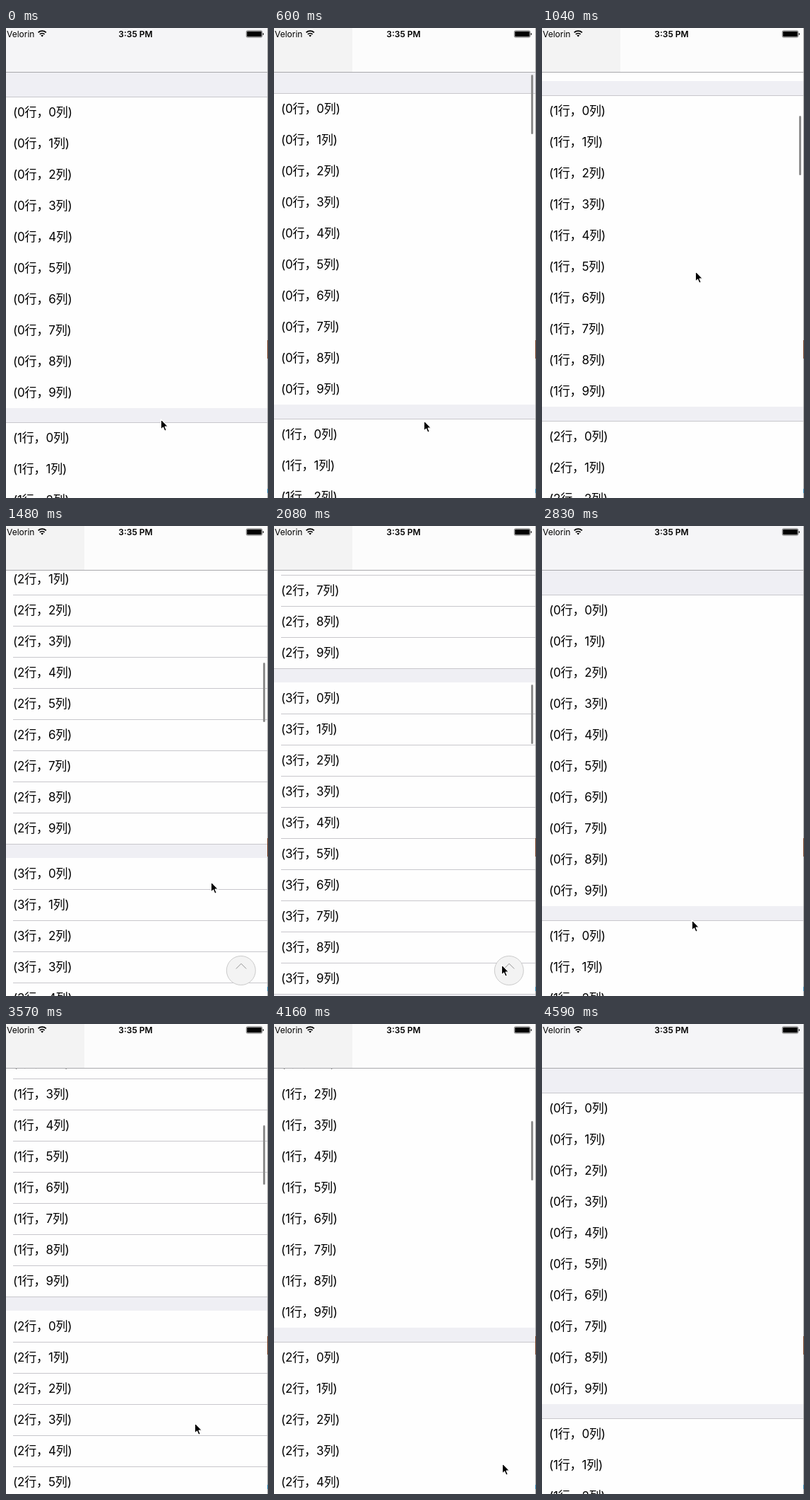
Write an HTML page that moves like this. It is 371 px wide and 664 px high and loops after 5090 ms.

```html
<!DOCTYPE html>
<html lang="zh-CN">
<head>
<meta charset="utf-8">
<title>Back to top</title>
<style>
  html, body { margin: 0; width: 100%; height: 100%; overflow: hidden; background: #fff; }
  #stage {
    position: relative; width: 371px; height: 664px; overflow: hidden; color: #000;
    background: #fefefe; font-family: Inter, "Noto Sans CJK SC", "Noto Sans CJK", sans-serif;
  }
  #stage > *, .gap, .row { position: absolute; }
  #list { left: 0; top: 0; width: 370px; }
  .gap { left: 0; width: 370px; background: #efeff4; }
  .row { left: 0; width: 370px; height: 44px; padding-left: 10px; box-sizing: border-box;
    font-size: 17px; line-height: 44px; letter-spacing: -.17px; white-space: nowrap; }
  .gap::after, .row::after { content: ""; position: absolute; left: 0; right: 0; top: 100%;
    height: 1px; background: #c8c7cc; z-index: 1; }
  .row::after { left: 10px; display: none; }
  .row.last::after { left: 0; z-index: 2; }
  .half .row::after { display: block; }
  .half .gap::after { display: none; }
  #bar { left: 364px; top: 0; width: 3px; height: 84px; border-radius: 2px; background: #8e8e8e; }
  #nav { left: 0; top: 0; width: 370px; height: 62px; background: #f5f5f7; border-bottom: 1px solid #a9a9ac; }
  #nav.over { background: linear-gradient(90deg, #f3f3f3 111px, #fcfcfc 111px); }
  .status { top: 0; height: 17px; line-height: 17px; font-size: 12px; white-space: nowrap; }
  #net { left: 1px; }
  #clock { left: 0; width: 367px; text-align: center; font-weight: 600; }
  #art { left: 0; top: 0; }
  #edge { left: 370px; top: 0; width: 1px; height: 664px;
    background: linear-gradient(#a3a3a3 441px, #71391d 441px 467px, #a3a3a3 467px 651px, #2b83b0 651px 657px, #a3a3a3 657px); }
</style>
</head>
<body>
<div id="stage">
  <div id="list"></div>
  <div id="bar"></div>
  <div id="nav"></div>
  <div class="status" id="net">Velorin</div>
  <div class="status" id="clock">3:35 PM</div>
  <svg id="art" width="371" height="664">
    <g fill="none" stroke="#000" stroke-width="1.8">
      <path d="M45.6 6.4a8.2 8.2 0 0 1 11.2 0M47.8 8.9a5 5 0 0 1 6.8 0"/>
      <path d="M51.2 12.6l-1.9-2a2.8 2.8 0 0 1 3.8 0z" fill="#000" stroke="none"/>
    </g>
    <rect x="340.3" y="3.8" width="22.4" height="9.4" rx="1.8" fill="none" stroke="#000" stroke-width=".5"/>
    <rect x="341.2" y="4.7" width="20.6" height="7.6" rx="1"/>
    <path d="M363.6 6.8q1.4.6 1.4 1.8t-1.4 1.8z"/>
    <g id="top" fill="none">
      <circle cx="332.8" cy="628" r="20.5" fill="#f3f3f3" stroke="#cbcbcb"/>
      <path d="M325.8 625.5l7.2-7.2 7.2 7.2" stroke="#888" stroke-width=".9"/>
    </g>
    <path id="cursor" d="M.3-.3V14.2L3.5 11.2 5.7 16.3 8.3 15.2 6.1 10.2H10.6Z"
      stroke="#fff" stroke-width="1.2" stroke-linejoin="round"/>
  </svg>
  <div id="edge"></div>
</div>
<script>
const LOOP = 5090, SECTION = 460, ROW = 44, FIRST = 97;
const FRAME = 147.5, BEGIN = 595, DECAY = 0.00214;
const HOME = [212, 557], BUTTON = [322, 620];
const $ = id => document.getElementById(id);
const [list, bar, nav, topButton, cursor] = ['list', 'bar', 'nav', 'top', 'cursor'].map($);

// Each flick glides to `end`, with `left` still to go at time `at`.
// The pointer lets go at `lift`, clicks the button and moves on to `exit`.
const flicks = [
  { start: 570, at: 1037.5, end: 1354.9, left: 892.7, lift: 1037.5, from: [217, 344], click: 2250, exit: HOME },
  { start: 2900, at: 3545, end: 889.6, left: 277, lift: 3251, from: [212, 533], click: 4030, exit: [380, 680] }
];

const progress = (t, start, length) => Math.min(1, Math.max(0, (t - start) / length));
const smooth = p => p * p * (3 - 2 * p);
const mix = ([x0, y0], [x1, y1], px, py = px) => [x0 + (x1 - x0) * px, y0 + (y1 - y0) * py];

function add(cls, top, height, text = '') {
  const el = document.createElement('div');
  el.className = cls;
  el.style.top = top + 'px';
  el.style.height = height + 'px';
  el.textContent = text;
  list.append(el);
}

for (let s = 0; s < 10; s++) {
  const y = FIRST + s * SECTION, gap = s ? 20 : 35;
  add('gap', y - gap, gap);
  for (let r = 0; r < 10; r++)
    add(r < 9 ? 'row' : 'row last', y + r * ROW, ROW, `(${s}行，${r}列)`);
}

function scrollAt(t, f) {
  const until = Math.min(t, f.click);
  const drag = Math.max(0, 0.2 * (until - f.start));
  const glide = f.end - f.left * Math.exp(-DECAY * (until - f.at));
  return Math.max(drag, glide) * (1 - smooth(progress(t, f.click, 300)));
}

function pointerAt(t, f) {
  if (t < 150) return [219, 553];
  if (t < f.lift) return mix(HOME, f.from, smooth(progress(t, f.start, f.lift - f.start)));
  if (t < f.click) {
    const p = progress(t, f.lift, 700);
    return mix(f.from, BUTTON, p ** 0.8, p ** 1.2);
  }
  return mix(BUTTON, f.exit, progress(t, f.click + 100, 450));
}

// the picture refreshes in even steps once the first flick begins
function stepTime(now) {
  if (now < BEGIN) return now < 150 ? 0 : 150;
  const last = Math.floor((LOOP - 500 - BEGIN) / FRAME);
  return BEGIN + FRAME * Math.min(last, Math.floor((now - BEGIN) / FRAME));
}

function draw() {
  const t = stepTime(performance.now() % LOOP);
  const flick = flicks[t < flicks[1].start ? 0 : 1];
  // hairlines show differently on whole and half points
  const offset = Math.floor(scrollAt(t, flick) * 2) / 2;
  const moving = offset > 0;
  list.style.transform = `translateY(${-Math.floor(offset)}px)`;
  list.className = offset % 1 ? 'half' : '';
  nav.className = moving ? 'over' : '';
  bar.style.display = moving ? '' : 'none';
  bar.style.transform = `translateY(${Math.round(65.8 + offset * 0.126)}px)`;
  topButton.style.display = offset > 667 ? '' : 'none';
  const [x, y] = pointerAt(t, flick).map(Math.round);
  cursor.setAttribute('transform', `translate(${x} ${y})`);
  requestAnimationFrame(draw);
}
draw();
</script>
</body>
</html>
```
